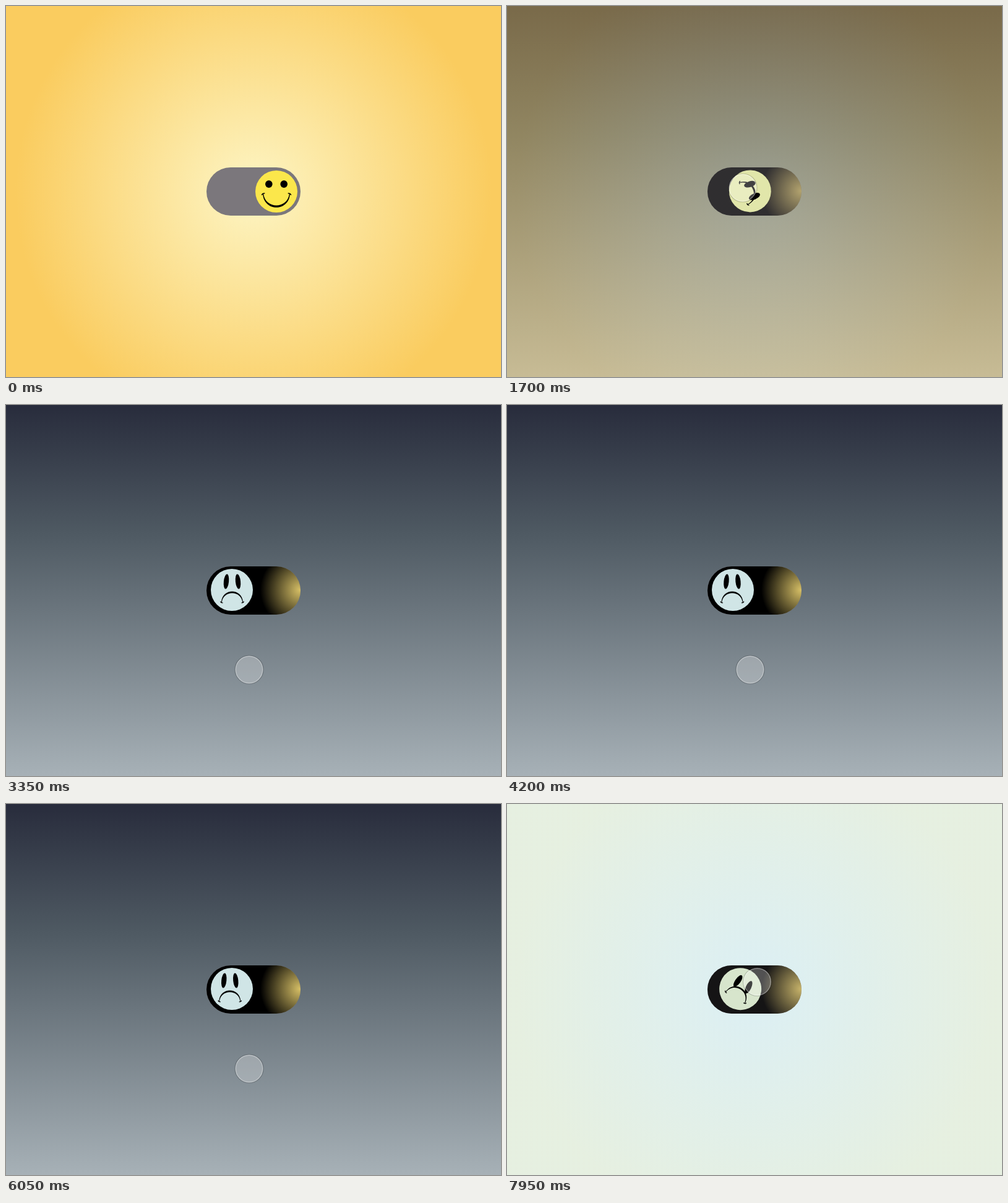
These frames come from a looping animation (800x600 px, 8000 ms). An HTML page:

```html
<!DOCTYPE html>
<html lang="en">
<head>
<meta charset="utf-8">
<title>Mood toggle</title>
<style>
  html, body { margin: 0; width: 100%; height: 100%; overflow: hidden; }
  svg { display: block; width: 100vw; height: 100vh; }
</style>
</head>
<body>
<svg viewBox="0 0 800 600">
  <defs>
    <radialGradient id="sunny" gradientUnits="userSpaceOnUse" cx="400" cy="300" r="385">
      <stop offset="0" stop-color="#fdf5c4"/>
      <stop offset="1" stop-color="#facc5f"/>
    </radialGradient>
    <radialGradient id="pale" gradientUnits="userSpaceOnUse" cx="400" cy="300" r="385">
      <stop offset="0" stop-color="#d5eefe"/>
      <stop offset="1" stop-color="#e2f7fb"/>
    </radialGradient>
    <linearGradient id="gloomy" x1="0" y1="0" x2="0" y2="1">
      <stop offset="0" stop-color="#282c3c"/>
      <stop offset=".35" stop-color="#4f5a63"/>
      <stop offset="1" stop-color="#a7b1b7"/>
    </linearGradient>
    <radialGradient id="glow" gradientUnits="userSpaceOnUse" cx="475" cy="299" r="64">
      <stop offset="0" stop-color="#d6bf66"/>
      <stop offset="1" stop-color="#000"/>
    </radialGradient>
  </defs>

  <rect width="800" height="600" fill="url(#sunny)"/>
  <rect id="paleSky" width="800" height="600" fill="url(#pale)"/>
  <rect id="gloomySky" width="800" height="600" fill="url(#gloomy)"/>

  <rect x="324" y="261" width="152" height="78" rx="39" fill="#7b777c"/>
  <rect id="darkTrack" x="324" y="261" width="152" height="78" rx="39" fill="url(#glow)"/>

  <g id="face">
    <circle id="skin" r="34"/>
    <g id="features">
      <ellipse id="leftEye"/>
      <ellipse id="rightEye"/>
      <g id="mouth">
        <path d="M-22 4C-20 33 20 33 22 4L20.8 4C18 28.6-18 28.6-20.8 4Z"/>
        <path d="M-23.5 5.2Q-22.5 2.6-19.3 3M23.5 5.2Q22.5 2.6 19.3 3"
              fill="none" stroke="#000" stroke-width="1.5" stroke-linecap="round"/>
      </g>
    </g>
  </g>

  <g id="cursor">
    <circle r="23" fill="none" stroke="#000" stroke-opacity=".18" stroke-width="1.2"/>
    <circle r="21.8" fill="#fff" fill-opacity=".26" stroke="#fff" stroke-opacity=".4" stroke-width="1.4"/>
  </g>
</svg>
<script>
const LOOP = 8000;
const TOGGLE = 560;
const SADDEN = 1380;
const CHEER = 7800;
const HAPPY_SKIN = [251, 231, 75];
const SAD_SKIN = [208, 229, 230];
// time, x, y
const CURSOR_PATH = [
  [0, 384, -24], [900, 381, 294], [1950, 381, 294],
  [2600, 393, 428], [7100, 393, 428], [7700, 404.5, 287.5], [8000, 404.5, 287.5]
];

const el = id => document.getElementById(id);
const set = (id, attrs) => {
  for (const name in attrs) el(id).setAttribute(name, attrs[name]);
};
const lerp = (a, b, k) => a + (b - a) * k;
const ramp = (t, start, length) => {
  const k = Math.min(1, Math.max(0, (t - start) / length));
  return (1 - Math.cos(Math.PI * k)) / 2;
};

function cursorAt(t) {
  const i = CURSOR_PATH.findIndex(step => step[0] > t);
  const [t0, x0, y0] = CURSOR_PATH[i - 1];
  const [t1, x1, y1] = CURSOR_PATH[i];
  const k = ramp(t, t0, t1 - t0);
  return [lerp(x0, x1, k), lerp(y0, y1, k)];
}

function drawEye(id, side, sad) {
  const x = side * lerp(12.2, 9.5, sad);
  const y = lerp(-12, 13.5, sad);
  set(id, {
    rx: lerp(5.8, 4.1, sad),
    ry: lerp(6, 12, sad),
    transform: `translate(${x} ${y}) rotate(${side * 6 * sad})`
  });
}

function draw(t) {
  const sad = ramp(t, SADDEN, TOGGLE) - ramp(t, CHEER, TOGGLE);
  const cheering = t >= CHEER;

  set('paleSky', { opacity: cheering ? sad : 0 });
  set('gloomySky', { opacity: cheering ? 0 : sad });
  set('darkTrack', { opacity: sad });

  // The face rolls half a turn, so the smile lands as a frown.
  set('face', {
    transform: `translate(${lerp(437, 365, sad)} ${lerp(300, 299, sad)}) rotate(${-180 * sad})`
  });
  const skin = HAPPY_SKIN.map((c, i) => Math.round(lerp(c, SAD_SKIN[i], sad)));
  set('skin', { fill: `rgb(${skin})` });

  const swayAmount = ramp(t, 1950, 350) - ramp(t, 7450, 350);
  const sway = 3.5 * swayAmount * Math.sin((t - 3314) / 1620 * 2 * Math.PI);
  set('features', { transform: `translate(${-sway} 0)` });
  drawEye('leftEye', -1, sad);
  drawEye('rightEye', 1, sad);
  set('mouth', {
    transform: `translate(0 ${-23.2 * sad}) scale(${lerp(1, 0.8, sad)})`
  });

  set('cursor', { transform: `translate(${cursorAt(t)})` });
}

const begin = performance.now();
function tick() {
  draw((performance.now() - begin) % LOOP);
  requestAnimationFrame(tick);
}
tick();
</script>
</body>
</html>
```
